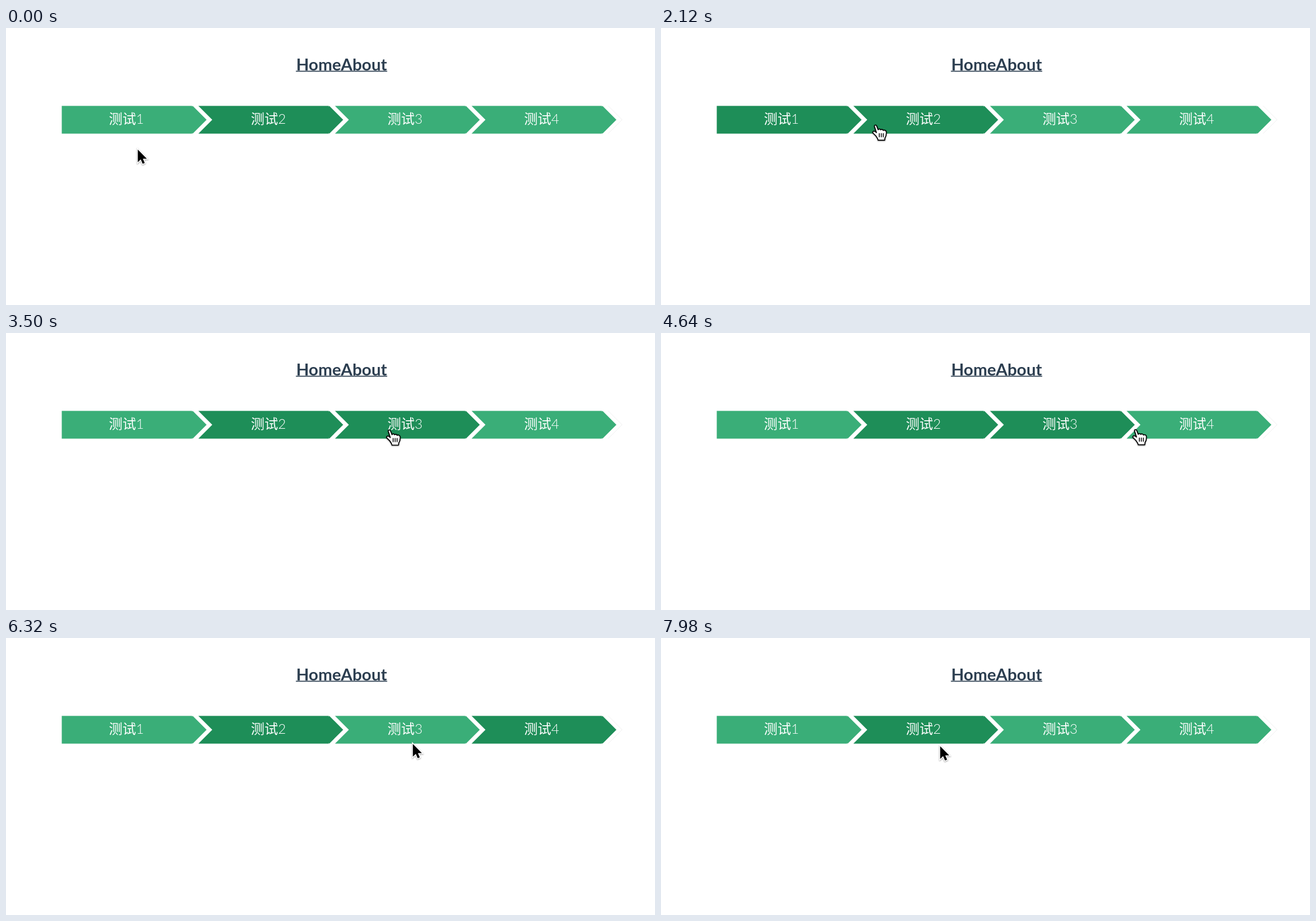
Animation of 1145 by 489 pixels, one loop 8000 ms. Source, as an HTML page:

```html
<!DOCTYPE html>
<html lang="zh">
<head>
<meta charset="utf-8">
<title>Steps</title>
<style>
  html, body { margin: 0; width: 100%; height: 100%; overflow: hidden; background: #fff; }
  svg { display: block; width: 1145px; height: 489px; }
  text { text-anchor: middle; font-family: Lato, "Noto Sans CJK SC", "Noto Sans CJK", sans-serif; }
  .nav { font-size: 29.3px; font-weight: 700; fill: #2c3e50; }
  .label { font-size: 24px; font-weight: 300; fill: #fff; }
  .cjk { font-family: "Noto Sans CJK SC", "Noto Sans CJK", sans-serif; }
  .cursor { filter: drop-shadow(0 1.5px 1.2px rgba(0, 0, 0, .4)); }
</style>
</head>
<body>
<svg viewBox="0 0 1145 489">
  <text class="nav" x="592" y="74.5">HomeAbout</text>
  <rect x="511.5" y="75.5" width="161" height="1.7" fill="#2c3e50"/>
  <g id="steps"></g>
  <g class="cursor" id="arrow">
    <path d="M0 0V22.5L5.2 17.6L8.6 25.3L12.3 23.7L9 16.2H16Z"
      fill="#000" stroke="#fff" stroke-width="3" paint-order="stroke"/>
  </g>
  <g class="cursor" id="hand">
    <g transform="translate(-6 -2)" stroke="#000" stroke-linecap="round" stroke-linejoin="round">
      <path fill="#fff" stroke-width="1.7" d="M4.5 3.5C4 1.2 7.2 .4 8.2 2.5L11 9.5
        C12 7.5 15 8 15.5 9.7C16.5 8.2 19.5 8.8 20 10.8C21.5 9.5 25 10.5 25.3 13
        C26 18 25 21 23 24L22.5 28H11L10 25C8 21 5 18 2 15.5C.5 13 3 11 5.5 12.5L8 14.5Z"/>
      <path fill="none" stroke-width="1.5" d="M13 16V22M16.5 16V22M20 16V22"/>
    </g>
  </g>
</svg>
<script>
const LOOP = 8000, LIGHT = '#3aae78', DARK = '#1e8e58';
const LEFT = 98.4, TOP = 137.4, BODY = 231, GAP = 10, TIP = 24.5;
const NS = 'http://www.w3.org/2000/svg';
const $ = id => document.getElementById(id);

// Pointer moves, each slowing down towards its end
const origin = { x: 232.5, y: 214.5 };
const moves = [
  { from: 0, to: 840, x: 239, y: 171 },
  { from: 1920, to: 2840, x: 598, y: 174 },
  { from: 2840, to: 3220, x: 676, y: 172 },
  { from: 4440, to: 4920, x: 920, y: 171 },
  { from: 4920, to: 5440, x: 951, y: 160 },
  { from: 6140, to: 6500, x: 640, y: 196 },
  { from: 6500, to: 6720, x: 492.5, y: 191 }
];

// The second step stays dark, the others only while hovered
const hovers = [
  { step: 0, from: 360, to: 2220 },
  { step: 2, from: 2680, to: 4740 },
  { step: 3, from: 4740, to: 6420 }
];

function add(parent, tag, attrs = {}) {
  const el = document.createElementNS(NS, tag);
  for (const k in attrs) el.setAttribute(k, attrs[k]);
  return parent.appendChild(el);
}

// One side of a chevron pair: down and right to the tip, then back
const chevron = x => `${x} ${TOP}l${TIP} ${TIP}l${-TIP} ${TIP}`;

function addStep(i) {
  const left = LEFT + i * (BODY + GAP), edge = left + BODY;
  const notch = i ? `L${left + TIP} ${TOP + TIP}` : '';
  const shape = add($('steps'), 'path', {
    d: `M${left} ${TOP}H${edge - 1}v1.5L${chevron(edge)}l-1 -1.5v1.5H${left}${notch}Z`
  });
  const label = add($('steps'), 'text', {
    class: 'label', x: left + (BODY + (i ? 2 * TIP - GAP / 2 - 28 : -3)) / 2, y: 169
  });
  add(label, 'tspan', { class: 'cjk' }).textContent = '测试';
  add(label, 'tspan').textContent = i + 1;
  return shape;
}

const shapes = [0, 1, 2, 3].map(addStep);
add($('steps'), 'path', {
  d: 'M' + chevron(LEFT + 4 * (BODY + GAP)), fill: 'none', stroke: '#f0f0f0'
});

// The screen updates after holds of 20, 100 and 20 ms
function quantize(t) {
  const phase = t % 140;
  return t - phase + (phase < 20 ? 0 : phase < 120 ? 20 : 120);
}

function pointerAt(t) {
  let { x, y } = origin;
  for (const m of moves) {
    const k = Math.min(1, Math.max(0, (t - m.from) / (m.to - m.from)));
    const eased = 1 - (1 - k) ** 2;
    x += (m.x - x) * eased;
    y += (m.y - y) * eased;
  }
  return { x, y };
}

function draw(now) {
  const t = quantize(now % LOOP);
  const { x, y } = pointerAt(t);
  const over = y < TOP + 2 * TIP;
  for (const [id, shown] of [['hand', over], ['arrow', !over]]) {
    $(id).setAttribute('transform', `translate(${x} ${y})`);
    $(id).style.display = shown ? '' : 'none';
  }
  const hover = hovers.find(h => t >= h.from && t < h.to);
  shapes.forEach((el, i) => {
    const dark = i === 1 || (hover && hover.step === i);
    el.setAttribute('fill', dark ? DARK : LIGHT);
  });
}

const start = performance.now();
function tick() {
  draw(performance.now() - start);
  requestAnimationFrame(tick);
}
tick();
</script>
</body>
</html>
```
